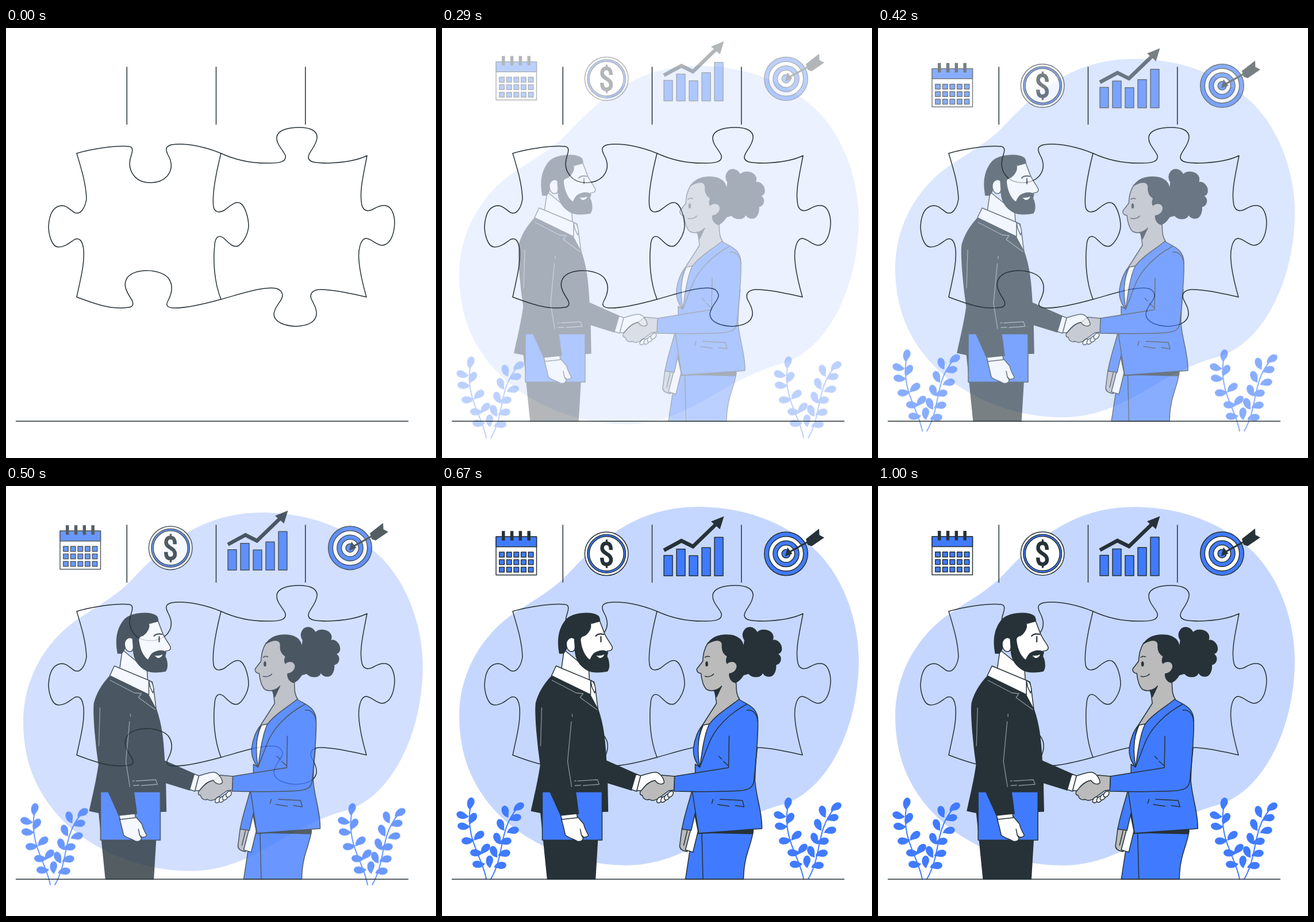
An HTML page for the animation above (1.04 s loop, 748 px wide and 748 px high).

```html
<!DOCTYPE html>
<html lang="en">
<head>
<meta charset="utf-8">
<title>Partnership handshake</title>
<style>
html, body { margin: 0; height: 100%; overflow: hidden; background: #fff }
svg { display: block; width: 100vw; height: 100vh; stroke: #263238; stroke-width: 1.5; stroke-linejoin: round; stroke-linecap: round; fill: none }
.blue { fill: #407bff }
.white { fill: #fff }
.skin { fill: #bbb }
.dark { fill: #263238 }
.bare { stroke: none }
.fold { stroke: #8d9498; stroke-width: 1.3 }
</style>
</head>
<body>
<svg viewBox="0 0 748 748">
  <defs>
    <path id="leaf" d="M-11 1C-8 -4 -3 -7 3 -6.500C8 -6 11 -3 11 0C11 3 8 6 3 6C-2 6 -6 2 -11 1Z"/>
  </defs>

  <g data-dy="-1">
    <path fill="#c6d7ff" class="bare" d="M445 36.5C537 36.5 607 71 652 114C700 162 725 236 725 305C724 430 665 535 590 555C510 578 480 610 430 632C400 647 365 660 320 660C235 660 155 625 105 578C59 534 30 478 30 400C30 320 75 255 125 222C165 195 195 180 222 150C280 88 345 36.5 445 36.5Z"/>
  </g>

  <!-- puzzle pieces and dividers -->
  <path d="M210.3 68V167.5M365.5 68V167.5M520.8 68V167.5"/>
  <path d="M123 218C150 210 190 204 214 206C222 207 220 215 218 221C213 235 214 246 222 256C234 273 266 273 280 258C292 244 287 230 282 221C277 211 277 206 288 203C315 199 350 208 374 218
    C366 250 358 290 361 311C363 321 371 322 380 317C390 309 400 300 408 305C416 310 422 330 422 345C421 360 411 375 404 379C394 383 386 372 378 365C370 359 364 364 363 377C360 405 362 442 374 472
    C345 480 310 488 290 487C279 486 278 481 282 474C290 459 290 446 283 436C272 420 228 416 212 433C203 445 208 456 217 470C223 479 222 485 213 486C185 490 160 482 123 468
    C130 435 137 410 135 385C133 370 128 364 119 368C110 374 103 381 91 381C80 381 74 360 74 345C75 328 80 310 97 309C106 309 111 316 119 321C130 326 138 312 140 297C139 270 131 245 123 218Z"/>
  <path d="M374 218C400 230 430 236 460 235C475 235 488 233 486 222C483 213 470 203 471 190C472 178 490 173 510 173C530 173 542 179 541 191C540 205 527 215 526 224C525 234 540 235 560 235C590 234 612 230 628 222
    C622 255 614 285 619 308C622 319 630 319 637 316C646 311 652 308 661 309C671 311 676 325 676 340C675 362 667 377 655 378C643 378 638 367 626 366C617 367 612 385 614 405C616 430 622 450 627 468
    C600 462 565 454 545 455C533 456 528 462 531 471C535 480 541 488 540 499C537 515 520 518 504 519C485 518 466 512 466 497C468 482 482 474 481 464C478 452 467 451 450 453C425 456 400 465 374 472"/>

  <g data-dy="1">
    <g id="calendar">
      <path class="white" d="M94 88h70.5v66.5h-70.5z"/>
      <path class="blue" d="M94 88h70.5v17.5h-70.5z"/>
    </g>
    <circle class="white" cx="286.2" cy="117.6" r="37.8"/>
    <circle class="blue" cx="286.2" cy="117.6" r="33.3"/>
    <circle class="white" cx="286.2" cy="117.6" r="30"/>
    <path stroke-width="6.5" stroke-linecap="butt" d="M293.8 111C293.8 103 291.5 99.5 286 99.5C280.5 99.5 278.5 103 278.5 107.5C278.5 118 294 117 294 128C294 133 291 136 286 136C281 136 278.3 133 278.3 124.5"/>
    <path stroke-width="3.2" stroke-linecap="butt" d="M286.5 93V100M286.5 135V142.5"/>
    <g id="bars" class="blue"></g>
    <path stroke-width="6.5" stroke-linecap="butt" stroke-linejoin="miter" d="M386 111.5L416.5 95L436.500 105L480 63"/>
    <path class="dark bare" d="M490.5 52.5L468 61.5L483.5 75Z"/>
    <g id="target"></g>
    <path stroke-width="3" d="M600 117L640 95"/>
    <path class="dark bare" d="M601 106.5L609.5 117.5L597 122ZM633 92L656 74L656.5 85L665 89.5L643 104.5L636 102Z"/>
  </g>

  <g data-dy="-1" id="plants" class="blue" stroke="none"></g>

  <g data-dx="1"><g transform="translate(-.8 0)">
    <!-- woman -->
    <path class="dark" d="M527 268C520 258 527 245 537 246C545 247 547 252 549 255C555 248 572 249 576 260C577 264 576 267 575 269C583 266 592 275 591 285C590 290 586 292 583 292C592 294 592 309 581 311C582 322 577 332 568 331C562 331 560 327 558 324C556 334 540 334 534 326L520 330Z"/>
    <path class="skin" d="M463 273C455 286 455 296 454 305L444 318C443 322 446 326 451 326C452 338 456 350 461 354C468 357 473 356 475 355L478 378L453 417L455 450L518 371C511 360 513 350 512 340L512 285L495 261Z"/>
    <path class="dark" d="M474 356C480 354 484 352 487 348L478 367Z"/>
    <path class="dark" d="M463 274C470 264 480 259 495 259C512 259 521 266 524 275L533 300C531 325 520 338 511 342C503 340 499 332 501 325L497 309C494 306 495 301 497 296C490 292 487 285 488 276C487 266 475 267 463 274Z"/>
    <path class="skin bare" d="M497 309C505 303 513 307 513 314C512 322 505 326 499 326L494 316Z"/>
    <path d="M458 298Q461 295 466 297M458 331C464 333 471 330 473 327"/>
    <ellipse class="dark bare" cx="461" cy="309.5" rx="2.3" ry="4.5"/>
    <path class="blue" d="M436 605L424 684H525C526 640 538 628 542 600Z"/>
    <path class="dark" d="M452 603L542 596L541 605L500 604Z"/>
    <path d="M452.500 604L454.500 684"/>
    <path class="skin" d="M418 595L414 626C414 632 420 635 427 636L436 598ZM427 600L421 625"/>
    <path class="white" d="M440 571L446 600L437 637L424 633Z"/>
    <path class="blue" d="M436 528C430 550 420 580 418 597L434 599L443 560Z"/>
    <path class="white" d="M455 416L465 414L460 455L449 489C443 470 444 440 455 416Z"/>
    <path class="blue" d="M517 371C530 380 551 384 550 410C551 440 545 480 545 514C548 545 558 570 557 596L447 604L436 531L441 520L441 484L449 489C453 460 457 432 465 415C478 397 500 385 517 371Z"/>
    <path class="blue" d="M449 489C441 480 437 468 438 455C440 440 446 425 453 417C446 436 444 460 449 489Z"/>
    <path d="M530 380C500 396 474 422 464 450L449 489M531 390C540 388 549 396 550 410M441 571L447 603"/>
    <path class="blue bare" d="M500 435L499 490L405 505L404 531C450 532 490 532 520 531C535 531 540 524 543 514L549 410L525 400Z"/>
    <path d="M500 435L499 490L405 505L404 531C450 532 490 532 520 530C535 528 541 525 543 514L549 455M482 470L487 475M490 479L499 487"/>
    <path d="M472 545L470 552M480 554L500 557M484 545L523 547L526 558L511 556"/>
    <path class="skin" d="M405 505L383 503L371 512C362 514 355 520 350 526C343 532 344 538 349 538C350 545 357 547 361 545C366 549 375 546 380 541L395 530L404 529Z"/>
  </g></g>

  <g data-dx="1"><g transform="translate(-.8 0)">
    <!-- man -->
    <path class="dark" d="M172 565L184 684H267L272 600Z"/>
    <path class="white" d="M213 285L208 320L257 340L256 320Z"/>
    <path class="white" d="M240 245L275 235L283 256C288 268 296 276 297 281C297 286 292 287 288 287L285 305H250L236 285Z"/>
    <path class="dark" d="M205 291C200 265 205 245 218 231C232 219 262 219 272 226C275 229 275 233 275 235L258 238C262 246 255 256 249 260C244 261 242 263 241 266L232 270C231 262 222 261 218 269C216 276 218 283 216 285L212 291Z"/>
    <path class="dark" d="M231 264L241 262C241 280 248 297 258 303C261 296 264 290 272 288C279 285 287 287 289 290C287 294 286 297 289 300C291 307 292 317 288 322C275 325 262 324 255 321C243 315 233 305 232 285Z"/>
    <path class="white" d="M231 266C226 261 219 265 217 272C216 281 220 288 226 288C231 288 232 284 232 280Z"/>
    <path class="white bare" d="M269 295Q277 296 283 293Q280 300 274 299Z"/>
    <path stroke-width="2.2" d="M277 262V271M268 261Q272 256 282 258"/>
    <path class="white" d="M258 338L265 341L268 358L272 390L255 365Z"/>
    <path class="dark" d="M191 331C178 345 168 362 164 378C162 400 167 450 172 485C168 515 160 545 156 565L175 569L289 566L288 516L330 529L338 501L286 478C284 440 281 415 272 389L257 361Z"/>
    <path class="white" d="M199 313L259 338L259 363L191 330ZM259 338L264 341C268 350 269 356 266 360L261 349Z"/>
    <path class="fold" d="M192 338L234 360L246 361L241 368L270 389M174 386L172 452M227 397V401M225.5 410L219 479L226 523M237 513L271 511L274 519L246 521M231 513H234M232 521L242 520.500"/>
    <path class="blue" d="M175 532H279V616H175Z"/>
    <path class="dark" d="M186 525L189 533L207 573L238 570L232 525Z"/>
    <path class="white" d="M208 578L213 598L215 607C219 612 230 614 236 618C242 619 246 617 246 612L243 607L247 611C251 611 255 610 255 607C251 600 248 594 247 588L236 575Z"/>
    <path class="white" d="M207 573L235 570L236 577L209 580Z"/>
    <path d="M241 597L243 607"/>
    <path class="white" d="M346 504C355 502 365 497 373 498C382 500 387 511 387 516C383 521 375 518 371 512C362 513 355 519 347 530L339 530Z"/>
    <path class="white" d="M338 501L346 504L339 531L330 528Z"/>
    <g id="fingers" class="white"></g>
  </g></g>

  <path d="M17.5 684H699.5"/>
</svg>

<script>
const pick = id => document.getElementById(id);
const range = n => [...Array(n).keys()];
const rect = (x, y, w, h, cls) => `<rect x="${x}" y="${y}" width="${w}" height="${h}" class="${cls}"/>`;

pick('calendar').innerHTML +=
  range(15).map(i => rect(99.8 + i % 5 * 12.6, 114.8 + Math.floor(i / 5) * 13.1, 8.6, 8.6, 'blue')).join('') +
  range(4).map(i => rect(104 + i * 14.8, 78, 5.5, 16.5, 'dark bare')).join('');

pick('bars').innerHTML = [120.5, 109.5, 121, 107, 89]
  .map((top, i) => rect(386 + i * 22, top, 15, 156 - top, 'blue')).join('');

pick('target').innerHTML = range(5)
  .map(i => `<circle cx="598.5" cy="117.6" r="${37.8 - i * 7.6}" class="${i % 2 ? 'white' : 'blue'}"/>`).join('');

pick('fingers').innerHTML = [[379, 546], [386, 545], [392, 541], [398, 536]]
  .map(([x, y]) => `<ellipse rx="3.8" ry="6" transform="translate(${x} ${y}) rotate(40)"/>`).join('');

// leaf centre and direction of its tip
const leaves = [
  [50, 553, -80], [36, 573, -165], [53, 579, -60], [38, 592, -175], [64, 609, -40], [45, 617, 175],
  [75, 632, -50], [60, 638, 180], [64, 658, 180], [83, 654, -90], [101, 661, -10],
  [133, 559, -35], [111, 567, -110], [127, 578, -15], [103, 590, -115], [123, 600, -15],
  [97, 614, -115], [110, 619, -15], [108, 640, -15], [91, 637, -115]
];
const plant = '<path fill="none" stroke="#407bff" stroke-width="2" d="M77 684C70 645 41 615 49 560M85 684C110 640 98 600 130 562"/>' +
  leaves.map(([x, y, a]) => `<use href="#leaf" transform="translate(${x} ${y}) rotate(${a})"/>`).join('');
pick('plants').innerHTML = plant + `<g transform="translate(552 0)">${plant}</g>`;

const LOOP = 1040, FPS = 24, SLIDE = 44.9;
const bezier = (s, a, b) => 3 * (1 - s) ** 2 * s * a + 3 * (1 - s) * s * s * b + s ** 3;

// cubic-bezier(.36, -.01, .5, 1.38)
function ease(x) {
  let lo = 0, hi = 1;
  for (let i = 0; i < 24; i++) {
    const mid = (lo + hi) / 2;
    if (bezier(mid, .36, .5) < x) lo = mid; else hi = mid;
  }
  return bezier(hi, -.01, 1.38);
}

const movers = document.querySelectorAll('[data-dx], [data-dy]');

function draw() {
  const step = Math.floor((performance.now() % LOOP + 4) * FPS / 1000);
  const p = step < 2 ? 0 : ease(Math.min(1, (step + .5) / FPS));
  const d = SLIDE * (p - 1);
  for (const g of movers) {
    const { dx = 0, dy = 0 } = g.dataset;
    g.setAttribute('transform', `translate(${dx * d} ${dy * d})`);
    g.setAttribute('opacity', Math.max(0, Math.min(1, p)));
  }
  requestAnimationFrame(draw);
}
draw();
</script>
</body>
</html>
```
